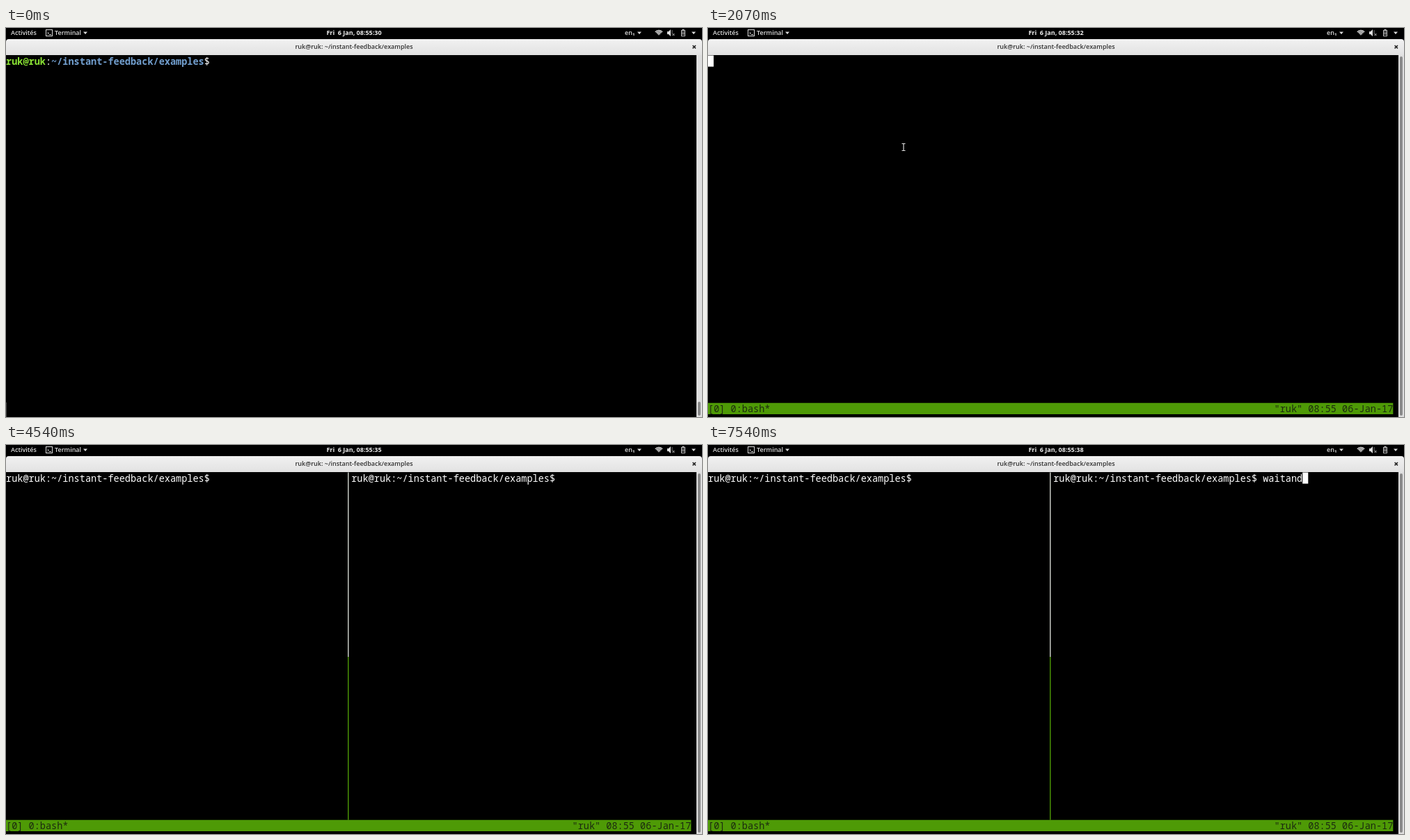
Animation of 1000x560 px, one loop 8000 ms. Source, as an HTML page with a canvas:

```html
<!DOCTYPE html>
<html lang="en">
<head>
<meta charset="utf-8">
<title>Terminal session</title>
<style>
html, body { margin: 0; height: 100%; overflow: hidden; background: #000; }
canvas { display: block; }
</style>
</head>
<body>
<canvas id="stage" width="1000" height="560"></canvas>
<script>
const ctx = document.getElementById('stage').getContext('2d');
const LOOP = 8000, BLINK = 600, KEY = 130;
const CELL = 8.135, ROW = 16.14, TOP = 39.5, COLS = 121, LAST = 31, SPLIT = 61;
const MONO = '13.55px "Noto Sans Mono", "DejaVu Sans Mono", monospace';
const UI = '9px "Open Sans", "Noto Sans", sans-serif';
const WHO = 'ruk@ruk', DIR = '~/instant-feedback/examples';
const PROMPT = `${WHO}:${DIR}$ `;
const GREEN = '#4e9a06', PALE = '#ddd';

// Story: enter, prompt ready, split key, split drawn, split prompt ready
const ENTER = 2000, START = 2070, READY = 2400, PREFIX = 3340, SPLIT_AT = 3940, SPLIT_READY = 4000;

// A burst of typing becomes one [time, character] pair per key
const burst = (start, text) => [...text].map((c, i) => [start + i * KEY, c]);
const firstKeys = burst(1070, 'tmux');
const secondKeys = [
  ...burst(5540, 'w'), ...burst(5740, 'ait'), ...burst(6540, 'an'), ...burst(7470, 'd')
];
const typed = (keys, t) => keys.filter(k => k[0] <= t).map(k => k[1]).join('');

// The cursor lights up again at each of these
const FIRST_BLINK = 70;
const wakes = [FIRST_BLINK, ENTER, READY, PREFIX, SPLIT_AT,
  ...[...firstKeys, ...secondKeys].map(k => k[0])];

function rect(x, y, w, h, color, radius = 0) {
  ctx.fillStyle = color;
  ctx.beginPath();
  ctx.roundRect(x, y, w, h, radius);
  ctx.fill();
}

function line(color, width, x1, y1, x2, y2) {
  ctx.strokeStyle = color;
  ctx.lineWidth = width;
  ctx.beginPath();
  ctx.moveTo(x1, y1);
  ctx.lineTo(x2, y2);
  ctx.stroke();
}

function cross(x, y, r, color, width) {
  line(color, width, x - r, y - r, x + r, y + r);
  line(color, width, x + r, y - r, x - r, y + r);
}

function glyph(d, x, y, color = PALE) {
  ctx.save();
  ctx.translate(x, y);
  ctx.fillStyle = color;
  ctx.fill(new Path2D(d));
  ctx.restore();
}

function label(text, x, y, color = PALE, align = 'left', weight = 600) {
  ctx.font = `${weight} ${UI}`;
  ctx.textAlign = align;
  ctx.fillStyle = color;
  ctx.fillText(text, x, y);
}

// Terminal text, one character per cell
function mono(text, col, row, color = '#fff', weight = 500) {
  ctx.font = `${weight} ${MONO}`;
  ctx.textAlign = 'center';
  ctx.fillStyle = color;
  [...text].forEach((c, i) => ctx.fillText(c, (col + i + 0.5) * CELL, Math.round(TOP + row * ROW + 13.3)));
}

function topBar(t) {
  const second = 30 + Math.floor((t + 730) / 1000);
  label('Activités', 7, 10);
  label('Terminal', 70, 10);
  label(`Fri  6 Jan, 08:55:${second}`, 500, 10, '#eee', 'center', 700);
  label('en₁', 889, 10);
  for (const x of [111, 907, 985]) glyph('M0 0h6l-3 3.5z', x, 5.5);

  // Terminal icon
  ctx.strokeStyle = PALE;
  ctx.lineWidth = 1;
  ctx.strokeRect(57.5, 2.5, 9, 9);
  label('›', 59, 9.5);
  line(PALE, 1, 62, 9.5, 65, 9.5);

  // Wireless
  ctx.lineWidth = 1.3;
  for (let r = 1; r < 8; r += 2) {
    ctx.beginPath();
    ctx.arc(938, 10.5, r, -2.4, -0.74);
    ctx.stroke();
  }
  // Muted volume
  glyph('M0 3h2l3-3v10l-3-3h-2z', 950, 2);
  line('#777', 1, 957, 3, 957, 8);
  cross(959, 9.5, 1.5, '#bbb', 1);
  // Battery
  ctx.strokeRect(970.5, 3.5, 5, 8);
  rect(971.5, 2, 3, 1, PALE);
  for (const y of [6, 8.5]) line(PALE, 1, 971, y, 975, y);
}

function windowFrame(inTmux) {
  const shade = ctx.createLinearGradient(0, 16, 0, 39);
  shade.addColorStop(0, '#f1f1f1');
  shade.addColorStop(1, '#e2e2e2');
  rect(0, 16, 1000, 23, shade, [4, 4, 0, 0]);
  label(`${WHO}: ${DIR}`, 500, 30, '#333', 'center');
  cross(988.8, 27.2, 2.2, '#222', 1.5);

  const top = inTmux ? 41 : 538;
  rect(992, 39, 8, 521, '#dedede');
  rect(994, top, 4, 558 - top, '#8b8b8b', 2);
}

// Both screens return the cursor's column
function shell(t) {
  const command = typed(firstKeys, t);
  mono(WHO, 0, 0, '#8ae234', 700);
  mono(':', 7, 0);
  mono(DIR, 8, 0, '#729fcf', 700);
  mono('$ ' + command, 35, 0);
  rect(0, 539, 1, 21, '#444');
  return PROMPT.length + command.length;
}

function tmux(t) {
  const status = '"ruk" 08:55 06-Jan-17', bottom = TOP + LAST * ROW;
  rect(0, bottom, COLS * CELL, ROW, GREEN);
  mono('[0] 0:bash*', 0, LAST, '#1c2a10', 400);
  mono(status, COLS - status.length, LAST, '#1c2a10', 400);

  if (t < READY) return 0;
  mono(PROMPT, 0, 0);
  if (t < SPLIT_AT) return PROMPT.length;

  const x = (SPLIT - 0.5) * CELL - 0.4;
  line('#d3d7cf', 1.4, x, TOP, x, 305);
  line(GREEN, 1.4, x, 305, x, bottom);
  if (t < SPLIT_READY) return SPLIT;
  const text = PROMPT + typed(secondKeys, t);
  mono(text, SPLIT, 0);
  return SPLIT + text.length;
}

function pointer() {
  line('#ddd', 1.2, 281, 167, 281, 176);
  for (const y of [166.5, 176.5]) line('#ddd', 1, 278.5, y, 283.5, y);
}

function draw(t) {
  const inTmux = t >= START;
  rect(0, 0, 1000, 560, '#000');
  topBar(t);
  windowFrame(inTmux);
  const col = inTmux ? tmux(t) : shell(t);

  const wake = Math.max(...wakes.filter(w => w <= t));
  if (t >= FIRST_BLINK && Math.floor((t - wake) / BLINK) % 2 === 0) {
    rect(col * CELL, TOP, CELL, ROW, '#fff');
  }
  if (t >= ENTER && t < PREFIX) pointer();
}

const begin = performance.now();
function tick() {
  draw((performance.now() - begin) % LOOP);
  requestAnimationFrame(tick);
}
tick();
</script>
</body>
</html>
```
